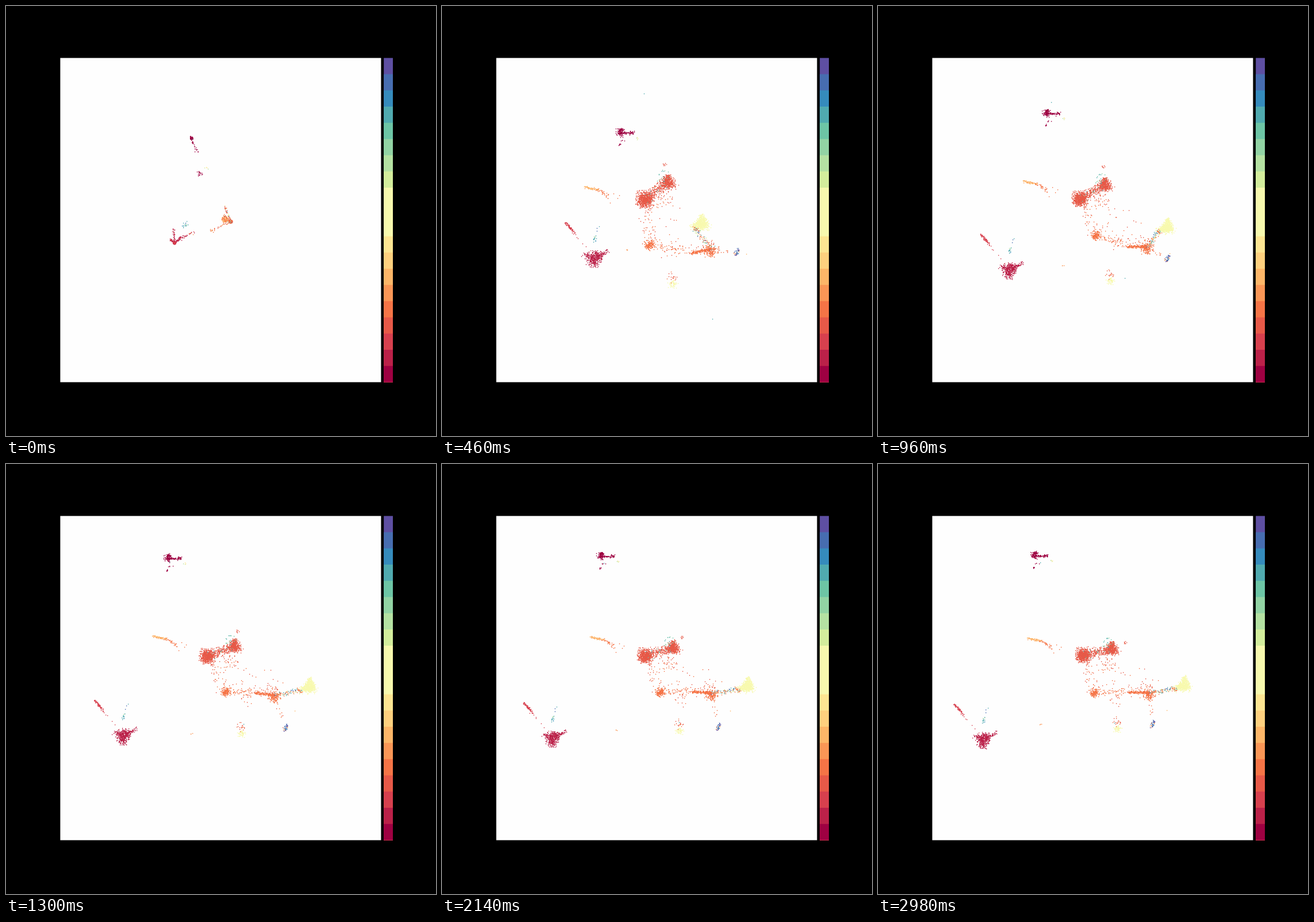
An HTML page with a canvas for the animation above (3.03 s loop, 748 px wide and 748 px high).

```html
<!DOCTYPE html>
<html lang="en">
<head>
<meta charset="utf-8">
<title>Embedding</title>
<style>
html, body { margin: 0; width: 100%; height: 100%; overflow: hidden; background: #000; }
canvas { display: block; width: 748px; height: 748px; }
</style>
</head>
<body>
<canvas id="stage" width="748" height="748"></canvas>
<script>
const ctx = document.getElementById('stage').getContext('2d');
const LOOP = 3030, STEP = 20, LAST = 2980;
const BURST = 460, SETTLE = 1340;   // end of the burst, end of the fast drift

let seed = 4711;
function rnd() {
  seed = (seed + 0x6d2b79f5) | 0;
  let h = Math.imul(seed ^ (seed >>> 15), 1 | seed);
  h = (h + Math.imul(h ^ (h >>> 7), 61 | h)) ^ h;
  return ((h ^ (h >>> 14)) >>> 0) / 4294967296;
}
const gauss = () => (rnd() + rnd() + rnd() - 1.5) * 2;
const pick = list => list[Math.floor(rnd() * list.length)];
const mix = (a, b, u) => a.map((v, i) => v + (b[i] - v) * u);
const clamp = u => Math.max(0, Math.min(1, u));

// Diverging ramp cut into 20 bands, with a flat middle
const RAMP = ['9e0142', 'd53e4f', 'f46d43', 'fdae61', 'fee08b', 'f7f9ae',
  'e6f598', 'abdda4', '66c2a5', '3288bd', '5e4fa2']
  .map(h => [0, 2, 4].map(i => parseInt(h.slice(i, i + 2), 16)));
const BANDS = 20;
const COLORS = Array.from({ length: BANDS }, (_, i) => {
  const s = i > 8 && i < 12 ? 5 : i / (BANDS - 1) * 10, k = Math.min(9, Math.floor(s));
  return `rgb(${mix(RAMP[k], RAMP[k + 1], s - k).map(Math.round)})`;
});
const WINE = [0], CRIMSON = [1], RED = [3], ORANGE = [4], AMBER = [5, 6, 6], YELLOW = [9];
const WARM = [3, 4], TEAL = [14, 15, 16], BLUE = [17, 18, 18, 19, 5];

// Drift from p to q, then slowly on to r; bend shapes the first leg
const path = (p, q, r, bend = 1) => t => t < SETTLE
  ? mix(p, q, Math.pow(clamp((t - BURST) / (SETTLE - BURST)), bend))
  : mix(q, r, (t - SETTLE) / (LAST - SETTLE));
const off = (p, dx, dy) => t => { const [x, y] = p(t); return [x + dx, y + dy]; };

// At the start most points sit on a corner, some stray along its arms
const CORNERS = {
  top: { at: [323, 230], stray: .2, arms: [[325, 239], [322, 227], [333, 259]] },
  left: { at: [293, 412], stray: .3, arms: [[286, 406], [307, 401], [292, 388], [329, 391]] },
  right: { at: [391, 375], stray: .045, arms: [[380, 348], [356, 391], [378, 364], [380, 372]] }
};
function startAt(from) {
  const c = CORNERS[from];
  if (!c) return from.map(v => v + gauss() * 2.5);
  const p = rnd() < c.stray ? mix(c.at, pick(c.arms), rnd()) : c.at;
  return p.map(v => v + gauss() * .9);
}

const groups = [];
// n points along a-b; taper narrows the spread towards b
function line(from, hues, n, a, b, spread, taper = 0) {
  const dots = Array.from({ length: n }, () => {
    const u = taper ? 1 - Math.sqrt(rnd()) : rnd(), s = spread * (1 - taper * u);
    return { from: startAt(from), u, gx: gauss() * s, gy: gauss() * Math.min(s, taper ? 3 : s),
      color: COLORS[pick(hues)], w: .01 + rnd() * .02 };
  });
  groups.push({ a, b, dots, fling: [0, 0] });
}
const blob = (from, hues, n, p, spread) => line(from, hues, n, p, p, spread);
// A single point thrown far out before it comes back
function stray(from, hues, p, q, fling) {
  const way = path(p, q, q, .6);
  blob(from, hues, 1, way, 0);
  groups[groups.length - 1].fling = fling;
}

const crest = path([311, 221], [281, 162], [273, 160]);
const wine = path([266, 438], [202, 474], [184, 479]);
const amber = path([249, 315], [256, 299], [261, 303], .8);
const redL = path([353, 337], [350, 335], [357, 333]);
const redR = path([392, 308], [397, 319], [406, 323], 1.6);
const redTip = path([387, 275], [405, 292], [430, 310], 2.5);
const orangeL = path([362, 415], [383, 396], [377, 398], .3);
const bar = path([434, 430], [434, 395], [437, 397], 2);
const orangeR = path([468, 426], [467, 402], [472, 401], 3);
const yellow = path([451, 380], [530, 389], [532, 386], .75);
const blue = path([513, 429], [484, 463], [478, 453], 2);
const lemon = path([401, 483], [410, 467], [416, 460], 2);
const pair = path([322, 424], [323, 471], [283, 453]);

// Pale yellow
line('right', YELLOW, 520, off(yellow, 0, 5), off(yellow, 2, -17), 6, .8);
line('right', YELLOW, 120, yellow, off(yellow, -20, 4), 5, .8);
blob('right', YELLOW, 55, lemon, 3);
line('right', WARM, 18, off(lemon, 0, -4), off(lemon, -2, -16), 3);

// Blue tail
line('right', BLUE, 34, off(blue, 2, -5), off(blue, -2, 5), 1.2);
line('right', WARM, 9, orangeR, blue, 2.5);

// Red pair with its scatter
blob('right', RED, 640, redL, 5.6);
line('right', RED, 420, off(redR, 1, 5), off(redR, 1, -14), 6, .8);
line('right', RED, 260, redL, redR, 4);
blob('right', RED, 7, redTip, 1.2);
blob('right', TEAL, 18, off(redR, -6, -13), 4.5);
line('right', TEAL, 14, redL, redR, 4);
line('right', WARM, 38, redL, orangeL, 5);
blob('right', WARM, 40, off(redR, -8, 24), 9);
line('right', WARM, 30, orangeL, off(yellow, -50, -18), 14);

// Orange chain
blob('right', ORANGE, 150, orangeL, 3.6);
line('right', ORANGE, 55, orangeL, bar, 3);
line('right', ORANGE, 150, bar, off(orangeR, 0, -3), .9);
line('right', ORANGE, 150, off(orangeR, 0, -3), off(orangeR, 1, 8), 6, .6);
line('right', [4, 4, 4, 5, 12, 16, 18], 90, off(orangeR, 2, -4), off(yellow, -13, 5), 2);
line('right', WARM, 34, off(bar, 0, -8), off(orangeR, 12, -8), 5);
blob('right', WARM, 10, off(orangeL, 36, 14), 5);

// Amber arc
line([381, 372], AMBER, 60, amber, off(amber, 24, 5), .8);
line([381, 372], ORANGE, 30, off(amber, 20, 4), off(amber, 42, 16), 1.3);
blob([360, 389], ORANGE, 5, off(amber, 48, 17), 5);

// Dark red crest
line('top', WINE, 90, crest, off(crest, 0, -6), 3.4, .8);
line('top', WINE, 70, off(crest, -5, 0), off(crest, 23, 0), .7);
blob([337, 292], WINE, 10, off(crest, 20, -1), 2);
line([332, 254], WINE, 4, off(crest, -3, 13), off(crest, 9, 13), .5);
blob([337, 292], WINE, 7, off(crest, -2, 20), .8);
blob([347, 280], [8, 12, 13], 4, off(crest, 29, 8), 1.2);

// Crimson wedge and its streak
line('left', CRIMSON, 380, off(wine, 0, -7), off(wine, -1, 17), 7.5, .7);
line('left', CRIMSON, 60, off(wine, 2, 0), off(wine, 22, -12), 1.6);
line('left', [2], 60, off(wine, -51, -61), off(wine, -38, -46), .7);
line('left', [2], 12, off(wine, -38, -46), off(wine, -8, -12), 1.2);
blob([311, 380], [16, 17, 16], 10, off(wine, -1, -32), 1.5);
line([311, 380], [13, 16, 18], 6, off(wine, -1, -32), off(wine, 8, -58), 1);
blob([322, 398], [5, 13], 3, pair, 1.2);

stray('top', TEAL, [352, 157], [282, 172], [4, -98]);
stray('right', TEAL, [471, 534], [412, 450], [0, 205]);
stray('right', AMBER, [523, 432], [502, 429], [128, 10]);

function drawFrame() {
  ctx.fillStyle = '#000';
  ctx.fillRect(0, 0, 748, 748);
  ctx.fillStyle = '#fefefe';
  ctx.fillRect(94.4, 90.4, 558, 564);
  // Each band covers the one above it, so shared edges blend
  for (let i = 0; i < BANDS; i++) {
    const h = 564 * (1 - i / BANDS);
    ctx.fillStyle = COLORS[BANDS - 1 - i];
    ctx.fillRect(657.2, 654.4 - h, 15.8, h);
  }
}

function draw(t) {
  drawFrame();
  const ease = 1 - Math.pow(1 - clamp(t / BURST), 3);
  const spread = 1 + 1.5 * Math.exp(-t / 220);
  const kick = t / 80 * Math.exp(1 - t / 80);
  for (const { a, b, dots, fling } of groups) {
    const pa = a(t), pb = b(t);
    for (const d of dots) {
      const [mx, my] = mix(pa, pb, d.u);
      const [x, y] = mix(d.from, [mx + d.gx * spread, my + d.gy * spread], ease);
      const wobble = .6 * ease * Math.sin(t * d.w);
      ctx.fillStyle = d.color;
      ctx.fillRect(Math.round(x + wobble + fling[0] * kick - .7),
        Math.round(y - wobble + fling[1] * kick - .7), 1.4, 1.4);
    }
  }
}

const begin = performance.now();
function tick() {
  const t = (performance.now() - begin) % LOOP;
  draw(Math.min(LAST, Math.floor(t / STEP) * STEP));
  requestAnimationFrame(tick);
}
tick();
</script>
</body>
</html>
```
